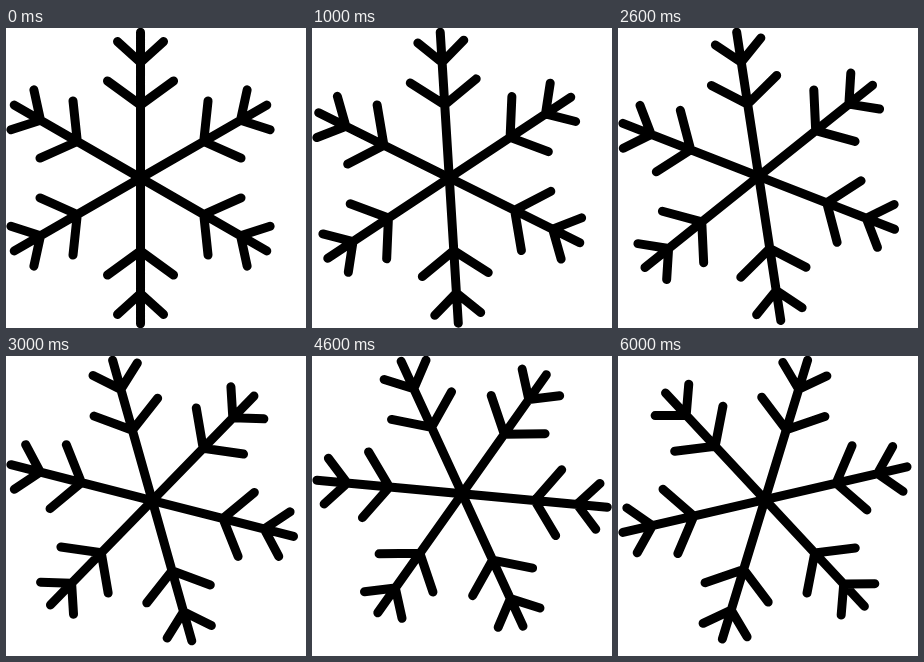
Animation, 300 px wide and 300 px high, one loop 7 s. Source, as an HTML page:

```html
<!DOCTYPE html>
<html lang="en">
<head>
<meta charset="utf-8">
<title>Turning snowflake</title>
<style>
html, body { margin: 0; width: 100%; height: 100%; overflow: hidden; background: #fff; }
svg { display: block; width: 100vw; height: 100vh; }
</style>
</head>
<body>
<svg viewBox="0 0 300 300">
  <g id="flake" fill="none" stroke="#000" stroke-width="9" stroke-linecap="round" stroke-linejoin="round"></g>
</svg>
<script>
const STEP = 1000;
const ARMS = 6;
const LENGTH = 145.8;
const BARBS = [
  { joint: 73, tip: 97, half: 33 },
  { joint: 115.5, tip: 136.4, half: 23 }
];
const turns = [0, 3.55, 8.7, 15.75, 24.7, 35.1, 43]; // degrees, anticlockwise

const flake = document.getElementById('flake');
const rad = deg => deg * Math.PI / 180;

const barbPath = b => `M${-b.half} ${-b.tip}L0 ${-b.joint}L${b.half} ${-b.tip}`;
const arm = `M0 0V${-LENGTH}` + BARBS.map(barbPath).join('');

for (let i = 0; i < ARMS; i++) {
  const path = document.createElementNS('http://www.w3.org/2000/svg', 'path');
  path.setAttribute('d', arm);
  path.setAttribute('transform', `rotate(${i * 360 / ARMS})`);
  flake.appendChild(path);
}

// Outermost points of one arm, as [across, along]
const outer = BARBS[BARBS.length - 1];
const ends = [[0, LENGTH], [outer.half, outer.tip], [-outer.half, outer.tip]];

// How far the turned flake reaches to the right and down
function reach(turn) {
  let x = 0, y = 0;
  for (let i = 0; i < ARMS; i++) {
    const a = rad(i * 360 / ARMS - turn);
    for (const [u, v] of ends) {
      x = Math.max(x, u * Math.cos(a) + v * Math.sin(a));
      y = Math.max(y, u * Math.sin(a) - v * Math.cos(a));
    }
  }
  return [x, y];
}

// The flake always touches the top and left edges of the stage
function draw(ms) {
  const turn = turns[Math.floor(ms / STEP) % turns.length];
  const [x, y] = reach(turn);
  flake.setAttribute('transform', `translate(${x + 4.9} ${y + 4.2}) rotate(${-turn})`);
}

const start = performance.now();
function tick() {
  draw(performance.now() - start);
  requestAnimationFrame(tick);
}
tick();
</script>
</body>
</html>
```
